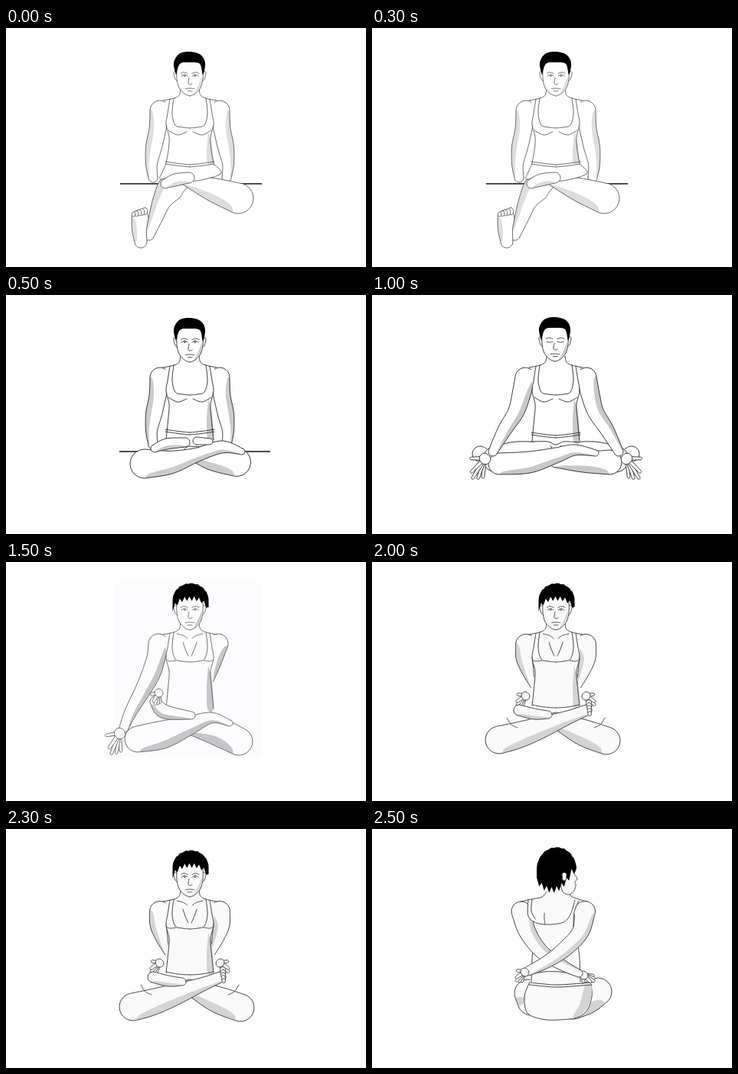
Animation, 470 px wide and 313 px high, one loop 3000 ms. Source, as an HTML page with a canvas:

```html
<!DOCTYPE html>
<html lang="en">
<head>
<meta charset="utf-8">
<title>Lotus sequence</title>
<style>
html, body { margin: 0; width: 100%; height: 100%; overflow: hidden; background: #fff; }
canvas { display: block; width: 470px; height: 313px; }
</style>
</head>
<body>
<canvas id="stage"></canvas>
<script>
const canvas = document.getElementById('stage');
const ctx = canvas.getContext('2d');
const ratio = window.devicePixelRatio || 1;
canvas.width = 470 * ratio;
canvas.height = 313 * ratio;
ctx.scale(ratio, ratio);
ctx.lineJoin = ctx.lineCap = 'round';

const AXIS = 240;
const POSE_MS = 500;
let pen;

// Catmull-Rom samples through points of any dimension.
function spline(points, steps = 10) {
  const at = i => points[Math.max(0, Math.min(points.length - 1, i))];
  const out = [];
  for (let i = 0; i < points.length - 1; i++) {
    for (let s = 0; s < steps; s++) {
      const t = s / steps;
      out.push(at(i).map((b, k) => {
        const a = at(i - 1)[k], c = at(i + 1)[k], d = at(i + 2)[k];
        return b + t * ((c - a) + t * ((2 * a - 5 * b + 4 * c - d) + t * (3 * b - a - 3 * c + d))) / 2;
      }));
    }
  }
  return [...out, at(points.length)];
}
function group(list, size) {
  return list.length ? [list.slice(0, size), ...group(list.slice(size), size)] : [];
}
function path(points) {
  ctx.beginPath();
  for (const [x, y] of points) ctx.lineTo(x, y);
}
function fill(points, color = pen.skin) {
  path(points);
  ctx.fillStyle = color;
  ctx.fill();
}
function outline(points) {
  path(points);
  ctx.strokeStyle = pen.color;
  ctx.lineWidth = pen.width;
  ctx.stroke();
}
const curve = (...xy) => spline(group(xy, 2));
const line = (...xy) => outline(curve(...xy));
const shade = (...xy) => fill(curve(...xy), pen.shade);
const skin = (...xy) => { fill(curve(...xy)); line(...xy); };

// Rounded limb along x, y, radius triples, shaded on its right (1) or left (-1).
function limb(side, ...xyr) {
  const spine = spline(group(xyr, 3));
  const last = spine.length - 1;
  const heading = i => {
    const a = spine[Math.max(0, i - 1)], b = spine[Math.min(last, i + 1)];
    return Math.atan2(b[1] - a[1], b[0] - a[0]);
  };
  const edge = (i, turn, scale = 1) => {
    const [x, y, r] = spine[i], angle = heading(i) + turn;
    return [x + r * scale * Math.cos(angle), y + r * scale * Math.sin(angle)];
  };
  const along = (turn, scale = () => 1) => spine.map((_, i) => edge(i, turn, scale(i / last)));
  const cap = (i, from) => Array.from({ length: 13 }, (_, k) => edge(i, from - k * Math.PI / 12));
  const q = Math.PI / 2;
  const rim = [...along(q), ...cap(last, q), ...along(-q).reverse(), ...cap(0, -q)];
  fill(rim);
  if (side) {
    const inner = u => 1 - 0.65 * Math.sqrt(Math.sin(Math.PI * u) + 1e-9);
    fill([...along(side * q), ...along(side * q, inner).reverse()], pen.shade);
  }
  outline(rim);
}

function mirrored(draw) {
  draw(1);
  ctx.save();
  ctx.translate(2 * AXIS, 0);
  ctx.scale(-1, 1);
  draw(-1);
  ctx.restore();
}
function shifted(dx, dy, draw) {
  ctx.save();
  ctx.translate(dx, dy);
  draw();
  ctx.restore();
}

function hand(x, y, degrees, reach) {
  const palm = 3 + reach * 0.14;
  const finger = (turn, length) => {
    const a = (degrees + turn) * Math.PI / 180;
    limb(0, x, y, 2.5, x + length * Math.cos(a), y + length * Math.sin(a), 1.8);
  };
  finger(65, reach * 0.65);
  for (let i = 0; i < 4; i++) finger(i * 13 - 20, reach * (0.9 + 0.1 * (i % 3)));
  limb(0, x, y, palm, x + 1, y + 1, palm);
}
function toes(x, y, dx, dy, size) {
  for (let i = 0; i < 5; i++) {
    const r = size * (1 - i * 0.1);
    limb(0, x + dx * i, y + dy * i, r, x + dx * i, y + dy * i - 2, r);
  }
}
function floor(y, left, right) {
  fill([[left, y - 0.8], [right, y - 0.8], [right, y + 0.8], [left, y + 0.8]], '#111');
}

function face(closed) {
  mirrored(() => skin(223, 57, 219, 58, 221, 67, 225, 70));
  fill(curve(223, 48, 225, 76, 240, 89, 255, 76, 257, 48));
  shade(256, 63, 254, 76, 245, 87, 251, 75);
  mirrored(() => {
    line(223, 48, 223, 66, 226, 78, 233, 86, 240, 89);
    line(228, 59.5, 232, 58, 237, 59.5);
    line(229, 63, 233, closed ? 64 : 61, 237, 63);
    if (!closed) limb(0, 233, 62.5, 0.8, 233.5, 62.5, 0.8);
  });
  line(239, 65, 238, 72, 240, 74, 243, 73);
  line(234, 79.5, 240, 79, 246, 79.5);
  line(237, 82.5, 243, 82.5);
}
function shortHairHead(closed) {
  face(closed);
  fill(curve(222, 62, 219, 46, 226, 34, 240, 31, 254, 35, 260, 46, 257, 61, 253, 47, 240, 45, 227, 47, 222, 62), '#000');
}
// Domed crown closed by a jagged fringe running from right to left.
function mop(x, y, rx, ry, locks, length, drop) {
  const dome = Array.from({ length: 25 }, (_, i) => {
    const a = Math.PI * (1 + i / 24);
    return [x + rx * Math.cos(a), y + ry * Math.sin(a) + Math.sin(i * 2.4) * 0.6];
  });
  const fringe = Array.from({ length: locks }, (_, i) => {
    const u = i / (locks - 1);
    return [x + rx * (1 - 2 * u), y + drop(u) + length * (i % 2)];
  });
  fill([...dome, ...fringe], '#000');
}
function messyHead() {
  face();
  mop(241, 50, 23.5, 22, 16, 6, u => 14 * Math.abs(2 * u - 1) ** 3 - 5);
}

function torso(waist, chest) {
  fill(curve(227, 80, 226, 88, 209, 95, 210, 126, 213, 143, 209, waist,
    271, waist, 267, 143, 270, 126, 271, 95, 254, 88, 253, 80));
  shade(264, 136, 268, 150, 271, waist, 263, waist, 262, 160);
  mirrored(() => {
    line(228, 80, 226, 88, 219, 92, 205, 95);
    line(214, 93, 211, 112, 209, 126, 213, 143, 212, 160, 209, waist);
    line(219, 92, 217, 112, 221, 127, 230, 130, 240, 131);
    chest();
  });
}
const pectorals = () => line(212, 134, 224, 140, 236, 136);
function cleavage() {
  line(231, 105, 234, 114, 238, 123);
  line(209, 128, 214, 130, 222, 129);
  line(223, 94, 231, 96, 237, 100);
}
function waistband(y) {
  for (const dy of [0, 3]) mirrored(() => line(208, y + dy, 225, y + 2.5 + dy, 240, y + 4 + dy));
}
function straightArms() {
  mirrored(() => limb(-1, 192, 196, 6, 190, 178, 7.5, 193, 156, 10.5, 198, 132, 11, 201, 108, 13));
}

function extendedLeg() {
  pen = { color: '#444', width: 0.8, shade: '#dedede', skin: '#fff' };
  floor(204, 149, 334);
  straightArms();
  limb(-1, 187, 272, 6, 195, 250, 9, 203, 228, 12, 214, 211, 17, 224, 202, 14);
  limb(-1, 176, 280, 8, 174, 264, 9.5, 175, 249, 11);
  toes(181, 241, -3.6, 1, 3.6);
  limb(1, 236, 200, 7, 268, 211, 15, 303, 223, 20);
  torso(177, pectorals);
  skin(209, 178, 204, 189, 202, 198, 226, 192, 240, 200, 260, 198, 281, 190, 271, 178);
  waistband(175);
  limb(1, 208, 204, 6, 221, 199, 8, 239, 196, 7);
  shortHairHead();
}

function handsOnThighs() {
  pen = { color: '#222', width: 0.9, shade: '#ccc', skin: '#fff' };
  floor(205, 148, 345);
  straightArms();
  torso(190, pectorals);
  waistband(176);
  limb(1, 240, 206, 8, 268, 214, 15, 301, 219, 18.5);
  limb(-1, 308, 205, 4, 282, 199, 8, 250, 209, 9, 215, 219, 15, 181, 221, 19);
  limb(0, 249, 191, 5, 266, 192, 4);
  limb(1, 194, 201, 5, 210, 195, 7, 234, 193, 6);
  shifted(0, -1, () => shortHairHead());
}

function meditation() {
  pen = { color: '#222', width: 0.9, shade: '#c8c8c8', skin: '#fff' };
  mirrored(() => {
    limb(0, 141, 208, 10, 143, 209, 10);
    limb(0, 225, 203, 10, 190, 207, 15, 162, 215, 17);
  });
  limb(1, 240, 218, 8, 275, 219, 13, 310, 219, 16);
  limb(-1, 292, 207, 4, 265, 203, 7, 240, 210, 10, 205, 219, 14, 166, 221, 14);
  mirrored(flip => limb(flip, 158, 205, 6, 173, 177, 9, 188, 153, 10.5, 195, 130, 12, 200, 108, 13));
  torso(191, pectorals);
  waistband(180);
  line(208, 192, 229, 192, 240, 196, 251, 192, 271, 193);
  mirrored(() => hand(147, 214, 115, 27));
  shifted(-1, -2, () => shortHairHead(true));
}

function oneArmBound() {
  pen = { color: '#666', width: 0.95, shade: '#c6c6c9', skin: '#fdfdff' };
  fill([[140, 27], [333, 27], [333, 256], [140, 256]], '#fcfcfe');
  limb(1, 267, 155, 4, 271, 134, 9, 277, 107, 13);
  limb(1, 154, 217, 6, 163, 196, 8, 177, 171, 10, 189, 147, 12, 196, 125, 12, 199, 107, 13);
  torso(192, cleavage);
  limb(1, 240, 216, 10, 275, 222, 18, 304, 235, 18);
  limb(-1, 292, 211, 4, 268, 204, 7, 240, 214, 12, 205, 226, 18, 172, 232, 17);
  limb(1, 195, 183, 7, 207, 196, 9, 242, 201, 5);
  hand(199, 171, 100, 14);
  hand(148, 224, 105, 26);
  messyHead();
}

function bothArmsBound() {
  pen = { color: '#444', width: 1, shade: '#d4d4d4', skin: '#fafafa' };
  mirrored(flip => limb(-flip, 210, 163, 3, 203, 142, 8, 199, 125, 11, 201, 108, 13.5));
  torso(188, cleavage);
  limb(1, 240, 207, 10, 275, 223, 17, 306, 234, 18);
  limb(-1, 280, 194, 7, 255, 204, 9, 220, 217, 14, 190, 227, 17, 166, 233, 18);
  mirrored(() => {
    line(176, 204, 182, 213, 190, 217);
    line(209, 187, 225, 190, 240, 191);
    hand(200, 175, 125, 14);
  });
  limb(1, 192, 194, 7, 212, 199, 7, 230, 200, 5);
  toes(283, 186, 0.3, 3.4, 3.5);
  messyHead();
}

function fromBehind() {
  pen = { color: '#444', width: 1, shade: '#d4d4d4', skin: '#fafafa' };
  limb(-1, 208, 226, 18, 204, 215, 18);
  limb(1, 262, 229, 20, 280, 222, 20, 295, 213, 18);
  fill(curve(228, 80, 208, 94, 210, 136, 209, 202, 271, 202, 266, 140, 266, 94, 256, 80));
  mirrored(() => line(211, 130, 211, 150, 209, 170, 208, 200));
  skin(205, 202, 199, 220, 203, 241, 222, 249, 243, 250, 267, 247, 281, 237, 287, 219, 286, 203);
  shade(278, 204, 286, 204, 286, 220, 279, 237, 262, 248, 271, 230);
  for (const y of [201, 204]) line(205, y, 225, y + 2, 245, y + 3, 287, y);
  line(208, 190, 225, 187, 245, 187, 262, 190);
  hand(276, 191, 25, 14);
  limb(1, 270, 189, 5, 248, 178, 7, 222, 161, 9, 203, 135, 11, 195, 108, 13);
  limb(1, 204, 186, 6, 228, 174, 8, 252, 157, 10, 272, 135, 11, 278, 108, 13.5);
  hand(199, 187, 125, 14);
  fill(curve(228, 80, 225, 87, 206, 93, 206, 117, 225, 124, 250, 122, 262, 117, 268, 94, 258, 86, 256, 80));
  line(228, 82, 222, 89, 208, 92, 194, 95);
  line(256, 82, 260, 88, 270, 92, 280, 95);
  line(204, 92, 204, 114, 215, 123, 232, 125, 250, 122, 259, 112, 265, 93);
  line(209, 92, 208, 107, 213, 118);
  line(270, 94, 264, 109, 263, 128);
  line(225, 110, 225, 118, 226, 125);
  skin(262, 42, 266, 53, 264, 58, 268, 65, 265, 69, 266, 74, 263, 82, 256, 86, 248, 80, 246, 60);
  mop(241, 53, 26, 29, 17, 8, u => 25 * Math.sin(Math.PI * Math.max(0, u - 0.12)) ** 0.7 - 2);
  limb(0, 251, 60, 3, 251, 65, 2.5);
}

const poses = [extendedLeg, handsOnThighs, meditation, oneArmBound, bothArmsBound, fromBehind];
let shown = -1;

function tick() {
  const index = Math.floor(performance.now() / POSE_MS) % poses.length;
  if (index !== shown) {
    shown = index;
    ctx.fillStyle = '#fff';
    ctx.fillRect(0, 0, 470, 313);
    poses[index]();
  }
  requestAnimationFrame(tick);
}
tick();
</script>
</body>
</html>
```
